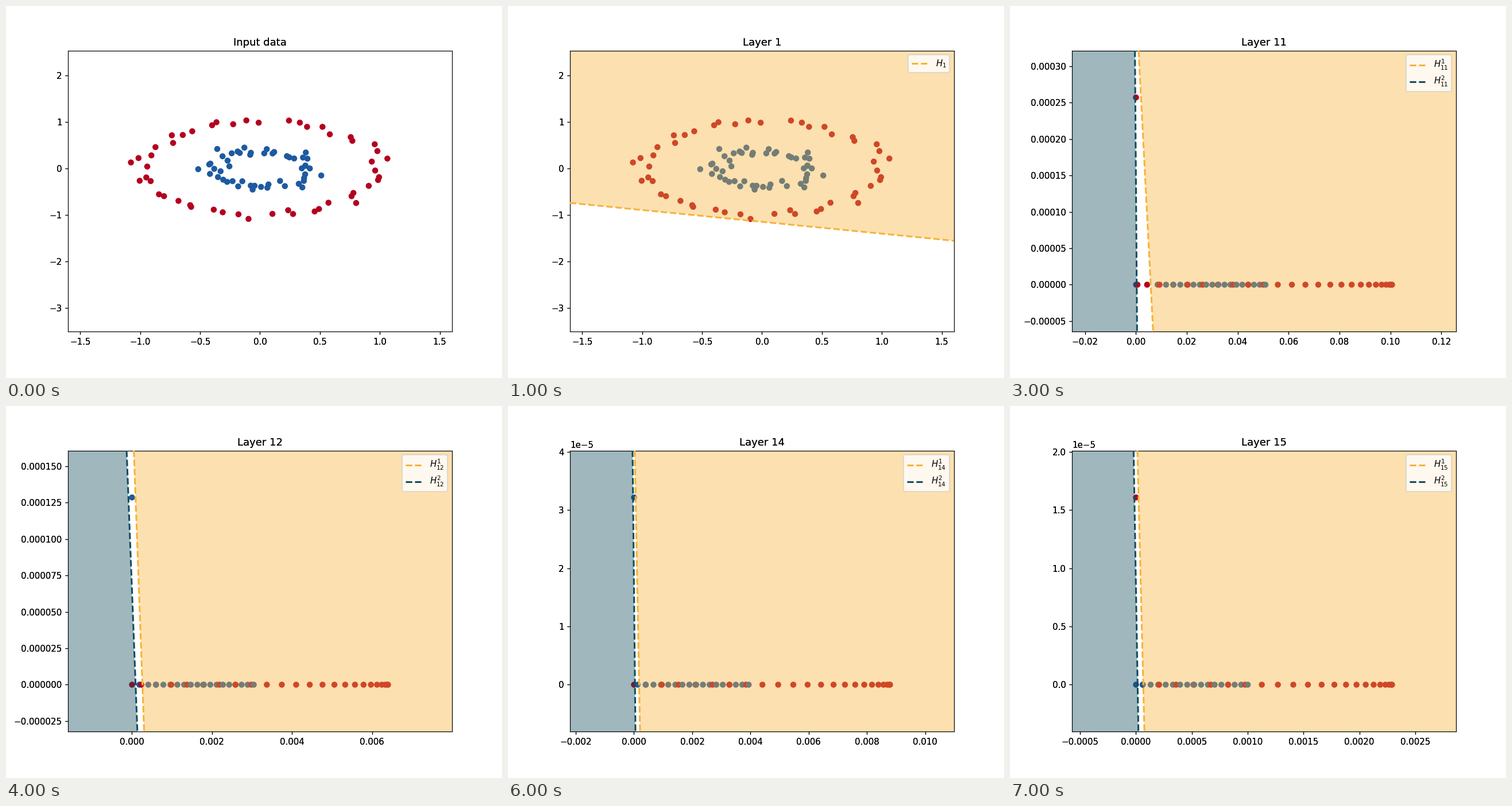
Recreate the animation shown at these times as a matplotlib script. Size 864 px wide and 648 px high, loop 8000 ms.

```python
import numpy as np
import matplotlib.pyplot as plt
from matplotlib.animation import FuncAnimation

RED, BLUE = "#b4001e", "#1d5a9f"
ORANGE, TEAL = "#f8b237", "#0f4c5c"
BOX = [0.125, 0.125, 0.7743, 0.755]
SPAN = 446.0  # stage pixels from the origin to the farthest point in deep layers

# Deep layers, in stage pixels: where each layer cuts the row of points,
# how far H1 leans, and how wide a gap H2 leaves at the origin
CUTS = [0, 2, 27.5, 44.5, 48.5, 56.5, 67.5]
LEANS = [2.27, 16.9, 11.95, 3.23, 6.13, 8.1]
GAPS = [0.6, 2.5, 12.5, 1, 3.4, 5.6]


def make_rings(n=50, inner=0.4, noise=0.05):
    """Two noisy circles in shuffled order, with one colour per point."""
    rng = np.random.RandomState(42)
    angle = np.linspace(0, 2 * np.pi, n, endpoint=False)
    circle = np.column_stack([np.cos(angle), np.sin(angle)])
    points = np.vstack([circle, inner * circle])
    order = np.arange(2 * n)
    rng.shuffle(order)
    points = points[order] + rng.normal(scale=noise, size=points.shape)
    return points, [RED if k < n else BLUE for k in order]


def make_row():
    """Both circles seen edge on: points crowd towards the far end."""
    reds = 4.5 + 441.5 * np.sin(np.linspace(0, np.pi / 2, 25)) ** 1.2
    blues = 39.5 + 187 * np.linspace(0, 1, 18) ** 0.9
    return sorted([(p, RED) for p in reds] + [(p, BLUE) for p in blues])


RINGS, RING_COLORS = make_rings()
ROW = make_row()

fig = plt.figure(figsize=(8, 6), dpi=108)
ax = fig.add_axes(BOX)
over = fig.add_axes(BOX, frameon=False)  # repeats the labels for heavier text


def frame_axes(title, xlim, ylim):
    for a in (ax, over):
        a.set_xlim(*xlim)
        a.set_ylim(*ylim)
        a.set_title(title)


def half_plane(xs, ys, corners, color, label):
    """Shade one side of a dashed line; corners close the region."""
    cx, cy = zip(*corners)
    ax.fill(list(xs) + list(cx), list(ys) + list(cy), color=color,
            alpha=0.4, lw=0, zorder=2)
    ax.plot(xs, ys, "--", color=color, lw=2, zorder=3, label=label)


def draw_rings(layer):
    xlim, ylim = (-1.603, 1.603), (-3.504, 2.536)
    ax.scatter(*RINGS.T, c=RING_COLORS, zorder=1)
    if layer:
        half_plane(xlim, (-0.738, -1.553),
                   [(xlim[1], ylim[1]), (xlim[0], ylim[1])], ORANGE, "$H_1$")
        ax.legend(loc="upper right")
    frame_axes("Layer 1" if layer else "Input data", xlim, ylim)


def h1_offset(step):
    """H1 meets the axis where the next layer cuts the row."""
    return (CUTS[step + 1] - CUTS[step]) * SPAN / (SPAN - CUTS[step])


def top_height(step):
    return 0.0005145 / 2 ** step


def row_length(step):
    """Distance of the farthest point from the previous layer's H1."""
    if step == 0:
        return 0.4603
    prev = step - 1
    return (SPAN - h1_offset(prev)) * top_height(prev) / LEANS[prev]


def draw_row(step):
    num, cut = step + 10, CUTS[step]
    top, xmax = top_height(step), row_length(step)
    unit = xmax / SPAN
    xlim = (-0.25 * xmax, 1.25 * xmax)
    ylim = (-0.25 * top, 1.25 * top)

    # The two merged groups trade places in every layer
    ends = [BLUE, RED] if step % 2 else [RED, BLUE]
    kept = [(p, c) for p, c in ROW if p > cut]
    xs = [(p - cut) / (SPAN - cut) * xmax for p, _ in kept]
    ax.scatter([0, 0] + xs, [0, top] + [0] * len(xs),
               c=ends + [c for _, c in kept], zorder=1)

    level = np.array([1.25, -0.25])
    h1 = (h1_offset(step) - LEANS[step] * level) * unit
    h2 = GAPS[step] * (0.5 - level) * unit
    for k, (line, side, color) in enumerate([(h1, xlim[1], ORANGE),
                                             (h2, xlim[0], TEAL)], 1):
        half_plane(line, level * top, [(side, ylim[0]), (side, ylim[1])],
                   color, f"$H_{{{num}}}^{k}$")
    ax.legend(loc="upper right", labelspacing=0.38)
    frame_axes(f"Layer {num}", xlim, ylim)


def draw(i):
    ax.clear()
    over.clear()
    if i < 2:
        draw_rings(i)
    else:
        draw_row(i - 2)
    return []


anim = FuncAnimation(fig, draw, frames=8, interval=1000, repeat=True,
                     repeat_delay=0, init_func=lambda: [])
plt.show()
```
